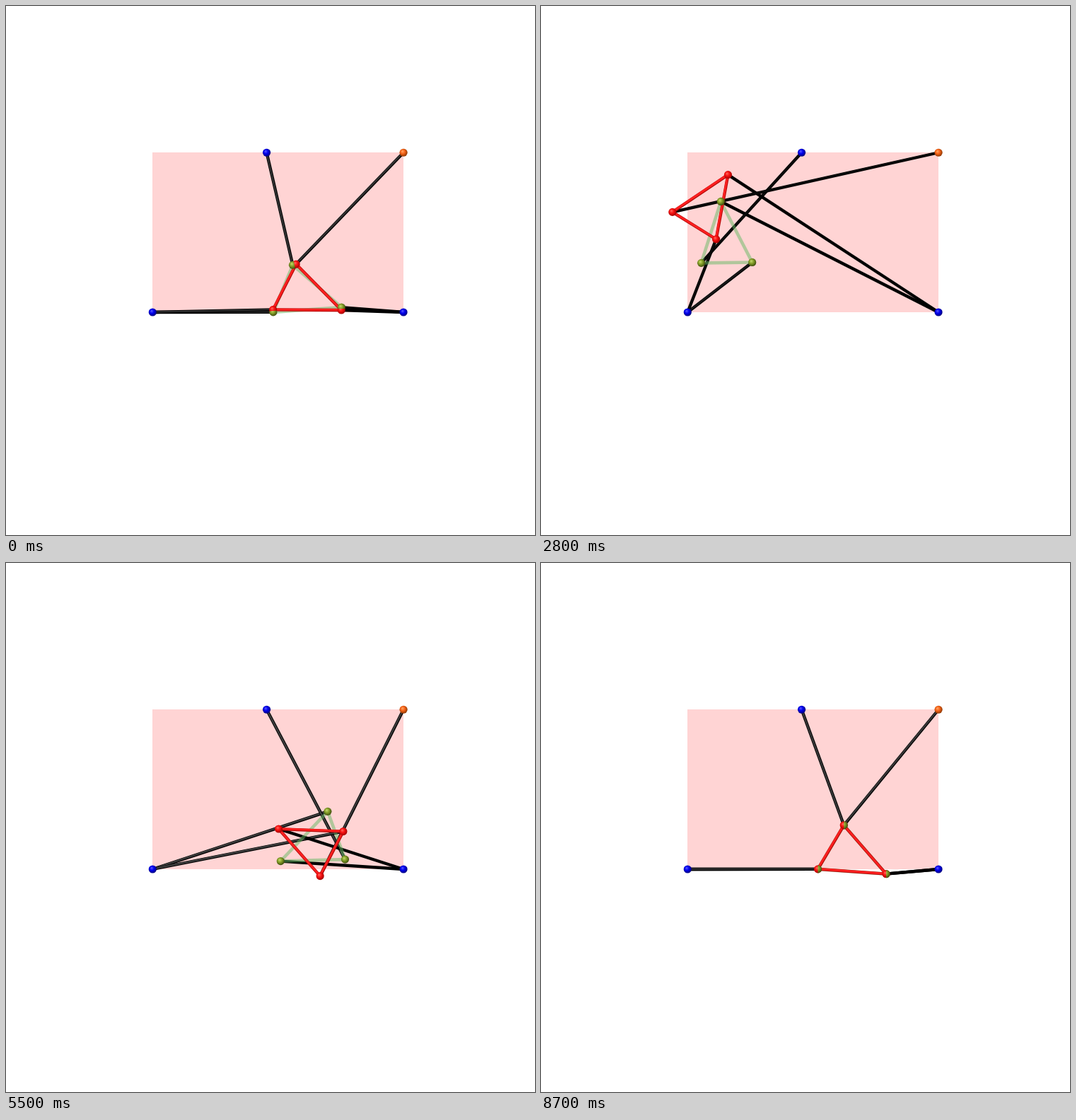
These frames come from a looping animation (748 by 748 pixels, 8800 ms). An HTML page with a canvas:

```html
<!DOCTYPE html>
<html lang="en">
<head>
<meta charset="utf-8">
<title>Planar linkage</title>
<style>
  html, body { margin: 0; width: 100%; height: 100%; overflow: hidden; background: #fff; }
  canvas { display: block; width: 748px; height: 748px; }
</style>
</head>
<body>
<canvas id="stage" width="748" height="748"></canvas>
<script>
const STEPS = 88, STEP_MS = 100, STARTS = 64;
const ANCHORS = [[0, 0], [11, 0], [5, 7]];
const CORNER = [11, 7];
const PLATE = [[0, 0], [3, 0], [1, 2]];
const SIDES = [[0, 1], [1, 2], [2, 0]];
const BARS = [
  ...ANCHORS.map((base, a) => ({ a, base })),
  ...SIDES.map(([a, b]) => ({ a, b }))
];

let seed = 20;
function random() {
  seed = (seed + 0x6D2B79F5) | 0;
  let v = Math.imul(seed ^ (seed >>> 15), 1 | seed);
  v = (v + Math.imul(v ^ (v >>> 7), 61 | v)) ^ v;
  return ((v ^ (v >>> 14)) >>> 0) / 4294967296;
}
const spread = size => (random() - 0.5) * size;
const distance = (p, q) => Math.hypot(...p.map((v, i) => v - q[i]));
const add = (p, q, f = 1) => p.map((v, i) => v + f * q[i]);
const cap = (s, max) => {
  const len = Math.hypot(...s);
  return len > max ? s.map(v => v * max / len) : s;
};

// Rigid plate: turns once while its first corner runs round an ellipse.
function rigidPose(k) {
  const f = (k + 1) * 2 * Math.PI / 89, c = Math.cos(f), s = Math.sin(f);
  return PLATE.flatMap(([x, y]) => [
    5.5 - 3 * s + x * c - y * s,
    1.5 - 1.5 * c + x * s + y * c
  ]);
}

function span(bar, p) {
  const i = 2 * bar.a, j = 2 * bar.b;
  return bar.base
    ? [p[i] - bar.base[0], p[i + 1] - bar.base[1]]
    : [p[i] - p[j], p[i + 1] - p[j + 1]];
}

const square = () => Array.from({ length: 6 }, () => new Array(6).fill(0));

// Elastic energy of the bars with its gradient and Hessian.
function elastic(p, rest) {
  const g = new Array(6).fill(0), jj = square(), h = square();
  let u = 0;
  BARS.forEach((bar, k) => {
    const w = rest[k] ** 1.5, [dx, dy] = span(bar, p);
    const r = (dx * dx + dy * dy - rest[k] ** 2) / (2 * w);
    const at = [2 * bar.a, 2 * bar.a + 1], row = [dx / w, dy / w];
    if (!bar.base) {
      at.push(2 * bar.b, 2 * bar.b + 1);
      row.push(-dx / w, -dy / w);
    }
    u += r * r / 2;
    for (let m = 0; m < at.length; m++) {
      g[at[m]] += r * row[m];
      for (let n = 0; n < at.length; n++) {
        const v = row[m] * row[n];
        jj[at[m]][at[n]] += v;
        h[at[m]][at[n]] += v + (m % 2 === n % 2 ? (m === n ? r : -r) / w : 0);
      }
    }
  });
  return { u, g, jj, h };
}

function solve(matrix, rhs, shift = 0) {
  const n = 6, a = matrix.map((row, i) => [...row, rhs[i]]);
  let det = 1;
  for (let i = 0; i < n; i++) {
    a[i][i] += shift;
  }
  for (let i = 0; i < n; i++) {
    let top = i;
    for (let j = i + 1; j < n; j++) if (Math.abs(a[j][i]) > Math.abs(a[top][i])) top = j;
    if (top !== i) {
      [a[i], a[top]] = [a[top], a[i]];
      det = -det;
    }
    det *= a[i][i];
    if (!a[i][i]) a[i][i] = 1e-14;
    for (let j = i + 1; j < n; j++) {
      const f = a[j][i] / a[i][i];
      for (let c = i; c <= n; c++) a[j][c] -= f * a[i][c];
    }
  }
  const x = new Array(n).fill(0);
  for (let i = n - 1; i >= 0; i--) {
    let v = a[i][n];
    for (let c = i + 1; c < n; c++) v -= a[i][c] * x[c];
    x[i] = v / a[i][i];
  }
  return { x, det };
}

// Newton search for a saddle of the energy.
function findSaddle(p, rest) {
  for (let n = 0; n < 36; n++) {
    const e = elastic(p, rest), s = solve(e.h, e.g);
    p = add(p, cap(s.x, 0.8), -1);
    if (Math.hypot(...s.x) < 1e-9) return s.det < 0 ? { p, u: e.u } : null;
  }
  return null;
}

function descend(p, rest) {
  let mu = 0.01, e = elastic(p, rest);
  for (let n = 0; n < 120 && e.u > 1e-15; n++) {
    const next = add(p, cap(solve(e.jj, e.g, mu).x, 0.2), -1);
    const trial = elastic(next, rest);
    if (trial.u < e.u) {
      p = next;
      e = trial;
      mu = Math.max(mu * 0.4, 1e-9);
    } else {
      mu *= 4;
    }
  }
  return p;
}

// Does one side of the saddle relax back to the rigid pose?
function leadsHome(saddle, pose) {
  const far = distance(saddle.p, pose.green);
  const { jj } = elastic(saddle.p, pose.rest);
  const soft = cap(solve(jj, [0.3, -0.7, 0.5, 0.2, -0.4, 0.6], 1e-9).x, 1);
  return [1, -1].some(sign => {
    const start = add(saddle.p, soft, sign * 0.1 * Math.min(1, far));
    return distance(descend(start, pose.rest), pose.green) < far / 2;
  });
}

function consider(pose, start) {
  const s = findSaddle(start, pose.rest);
  if (!s || s.u >= pose.u * (1 - 1e-6)) return;
  if (pose.rejected.some(u => Math.abs(u - s.u) < 1e-6 * u)) return;
  if (leadsHome(s, pose)) {
    pose.red = s.p;
    pose.u = s.u;
  } else {
    pose.rejected.push(s.u);
  }
}

function considerNear(pose, other) {
  if (!other || !other.red) return;
  consider(pose, other.red);
  consider(pose, add(pose.green, add(other.red, other.green, -1)));
}

function scatter(p) {
  const size = random(), turn = spread(2.6 * size);
  const c = Math.cos(turn), s = Math.sin(turn);
  const mx = (p[0] + p[2] + p[4]) / 3, my = (p[1] + p[3] + p[5]) / 3;
  const sx = spread(4 * size), sy = spread(4 * size);
  return [0, 2, 4].flatMap(i => {
    const x = p[i] - mx, y = p[i + 1] - my;
    return [
      mx + sx + x * c - y * s + spread(0.4 * size),
      my + sy + x * s + y * c + spread(0.4 * size)
    ];
  });
}

function buildPoses() {
  const poses = [];
  for (let k = 0; k < STEPS; k++) {
    const green = rigidPose(k);
    const rest = BARS.map(bar => Math.hypot(...span(bar, green)));
    const pose = { green, rest, red: null, u: Infinity, rejected: [] };
    considerNear(pose, poses[k - 1]);
    for (let n = 0; n < STARTS; n++) consider(pose, scatter(green));
    poses.push(pose);
  }
  for (let k = STEPS - 2; k >= 0; k--) considerNear(poses[k], poses[k + 1]);
  for (let k = 1; k < STEPS; k++) considerNear(poses[k], poses[k - 1]);
  return poses;
}

const ctx = document.getElementById("stage").getContext("2d");
const SCALE = 32.25, RADIUS = 5.6;
const toScreen = ([x, y]) => [207.3 + x * SCALE, 433 - y * SCALE];
const corners = p => [0, 2, 4].map(i => toScreen([p[i], p[i + 1]]));

const BALLS = {
  blue: ["#5a5aff", "#0000ee", "#000078"],
  orange: ["#ffa765", "#f8651a", "#8a3500"],
  green: ["#c6da70", "#87a22a", "#3c4a0c"],
  red: ["#ff6a60", "#f81212", "#a00000"]
};

function line(a, b, color, width, dx = 0, dy = 0) {
  ctx.strokeStyle = color;
  ctx.lineWidth = width;
  ctx.beginPath();
  ctx.moveTo(a[0] + dx, a[1] + dy);
  ctx.lineTo(b[0] + dx, b[1] + dy);
  ctx.stroke();
}

function ball([x, y], name) {
  const [light, mid, dark] = BALLS[name];
  const fill = ctx.createRadialGradient(x - 1.5, y - 1.8, 0, x - 0.6, y - 0.7, RADIUS + 0.9);
  fill.addColorStop(0, light);
  fill.addColorStop(0.45, mid);
  fill.addColorStop(1, dark);
  ctx.fillStyle = fill;
  ctx.beginPath();
  ctx.arc(x, y, RADIUS, 0, 2 * Math.PI);
  ctx.fill();
}

// Overlapping balls meet along the line halfway between them.
function ballBeside(at, other, name) {
  const dx = at[0] - other[0], dy = at[1] - other[1];
  if (Math.hypot(dx, dy) > 2 * RADIUS) return ball(at, name);
  ctx.save();
  ctx.translate((at[0] + other[0]) / 2, (at[1] + other[1]) / 2);
  ctx.rotate(Math.atan2(dy, dx));
  ctx.beginPath();
  ctx.rect(0, -20, 30, 40);
  ctx.restore();
  ctx.save();
  ctx.clip();
  ball(at, name);
  ctx.restore();
}

function leg(base, tip, lit) {
  const tone = lit ? Math.max(12, Math.min(60, (tip[0] - 200) * 0.24)) : 0;
  line(base, tip, "#000", 4.3);
  if (lit) line(base, tip, `rgb(${tone},${tone},${tone})`, 2.4, -0.2, -0.3);
}

function draw(pose) {
  const green = corners(pose.green), red = corners(pose.red || pose.green);
  const bases = ANCHORS.map(toScreen), corner = toScreen(CORNER);
  ctx.fillStyle = "#fff";
  ctx.fillRect(0, 0, 748, 748);
  ctx.fillStyle = "#ffd4d4";
  ctx.fillRect(207, 207, 355, 226);

  green.forEach((tip, i) => leg(bases[i], tip, i !== 1));
  red.forEach((tip, i) => leg(i === 2 ? corner : bases[i], tip, i !== 1));
  SIDES.forEach(([a, b]) => {
    line(green[a], green[b], "rgba(100,185,100,0.5)", 4.6);
  });
  SIDES.forEach(([a, b]) => {
    line(red[a], red[b], "#b40808", 4.3);
    line(red[a], red[b], "#ff2020", 2.8, -0.3, -0.4);
  });

  bases.forEach(p => ball(p, "blue"));
  ball(corner, "orange");
  red.forEach(p => ball(p, "red"));
  green.forEach((p, i) => ballBeside(p, red[i], "green"));
}

const poses = buildPoses();
const begin = performance.now();
function tick() {
  const t = Math.max(0, performance.now() - begin);
  draw(poses[Math.floor(t / STEP_MS + 1e-6) % STEPS]);
  requestAnimationFrame(tick);
}
tick();
</script>
</body>
</html>
```
